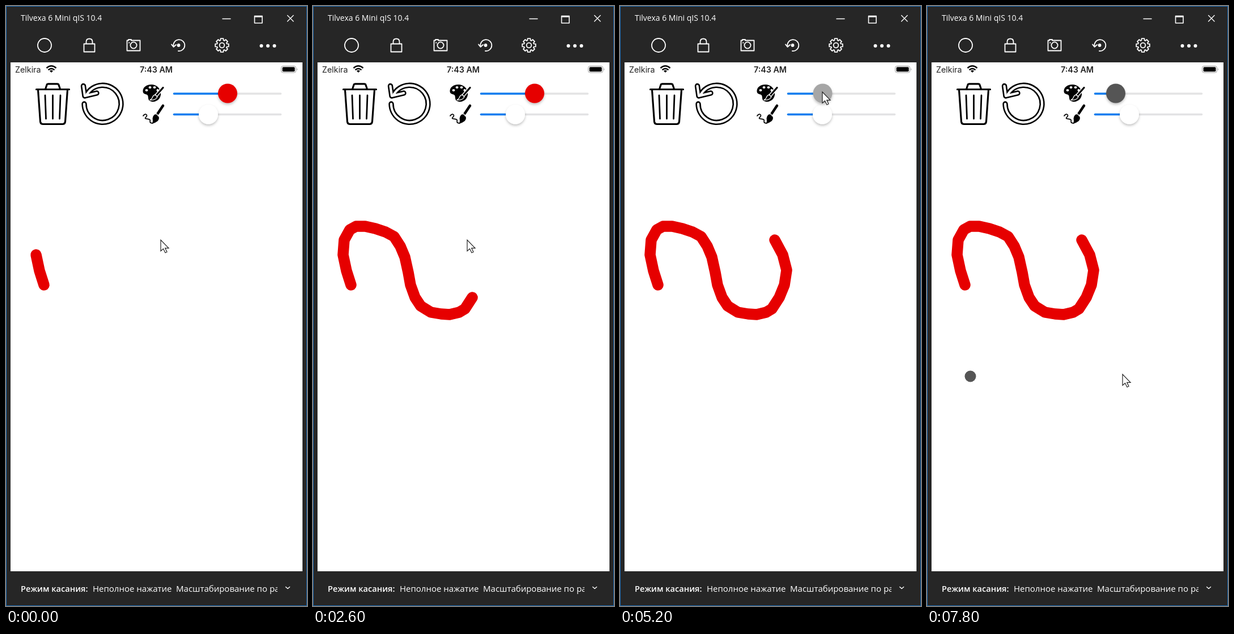
Recreate the animation shown at these times as an HTML page. Size 531 by 1054 pixels, loop 8 s.

```html
<!DOCTYPE html>
<html lang="ru">
<head>
<meta charset="utf-8">
<title>Drawing demo</title>
<style>
html, body { margin: 0; width: 100%; height: 100%; overflow: hidden; background: #262626; }
svg { display: block; width: 531px; height: 1054px; }
text { font-family: "Open Sans", "Noto Sans", sans-serif; fill: #fff; }
.status text { font: 14.3px Inter, Roboto, sans-serif; fill: #222; }
.line { fill: none; stroke-linecap: round; stroke-linejoin: round; }
.light { stroke: #fff; stroke-width: 1.8; }
.dark { stroke: #000; stroke-width: 3.2; }
</style>
</head>
<body>
<svg viewBox="0 0 531 1054">
  <defs>
    <filter id="shadow" x="-50%" y="-50%" width="200%" height="200%">
      <feDropShadow dx="0" dy="2.5" stdDeviation="2.2" flood-opacity=".25"/>
    </filter>
    <clipPath id="footerClip"><rect x="296" y="1005" width="183" height="36"/></clipPath>
  </defs>

  <rect x=".5" y=".5" width="530" height="1053" fill="#262626" stroke="#1c6db8"/>
  <rect x="8" y="99" width="515" height="894" fill="#fff"/>

  <!-- window title and toolbar -->
  <text x="26" y="26" font-size="14">Tilvexa 6 Mini qIS 10.4</text>
  <g class="line light">
    <path d="M382 22.5H396M496.500 16.500L507 27M507 16.500L496.500 27" stroke-width="1.4"/>
    <path d="M438.500 17.500H452V30H438.500ZM438.500 19H452" stroke-width="1.6"/>
    <circle cx="68" cy="69" r="12"/>
    <path d="M137.500 66.500H156.500V80.500H137.500ZM141.500 66V63Q141.500 57.500 147 57.500T152.500 63V66"/>
    <path d="M213.500 60.500H216V59H221V60.500H236.500V78.500H213.500Z"/>
    <circle cx="225" cy="69" r="5.600"/>
    <path d="M217 64.500H217.500"/>
    <path d="M295.500 71A10 10 0 1 1 304 79M292 67.500L295.500 72L300 68"/>
    <circle cx="304.500" cy="69" r="2" fill="#fff"/>
    <path id="gear"/>
    <circle cx="381" cy="69" r="4.300"/>
    <path d="M493.500 1020.500L497 1023.500L500.500 1020.500" stroke-width="1.4"/>
  </g>
  <g fill="#fff">
    <circle cx="450.500" cy="70" r="3"/><circle cx="462" cy="70" r="3"/><circle cx="473.500" cy="70" r="3"/>
  </g>

  <!-- phone status bar -->
  <g class="status">
    <text x="16" y="117">Zelkira</text>
    <text x="265" y="117" text-anchor="middle" style="font-weight:600">7:43 AM</text>
    <g class="line" stroke="#000" stroke-width="2.4" style="stroke-linecap:butt">
      <path d="M71.500 109Q80 101.500 88.500 109M74.500 112.300Q80 107.500 85.500 112.300"/>
      <path d="M77 114Q80 111.700 83 114L80 117Z" fill="#000" stroke="none"/>
    </g>
    <rect x="485.500" y="105.500" width="26" height="11.500" rx="3.300" fill="none" stroke="#999"/>
    <rect x="487.500" y="107.300" width="22" height="8" rx="1.800"/>
    <path d="M513.300 109.300Q515.500 111.300 513.300 113.300Z" fill="#999"/>
  </g>

  <!-- trash and undo -->
  <g class="line dark">
    <path d="M53.500 146.500H111.500M69.500 146L72 138.500Q72.500 136.800 74.500 136.800H90.500Q92.500 136.800 93 138.500L95.500 146"/>
    <path d="M56.500 147L60.500 203Q61 207.500 65.500 207.500H99.500Q104 207.500 104.500 203L108.500 147"/>
    <path d="M69 157L70.500 198M82.500 157V198M96 157L94.500 198" stroke-width="2.8"/>
  </g>
  <g class="line">
    <path id="undo" d="M138 172A32.500 32.500 0 1 0 143 154.500M136.500 140.500L139 158L160 153" stroke="#000" stroke-width="9.400"/>
    <use href="#undo" id="undoCore"/>
    <path d="M138 172A32.500 32.500 0 1 0 143 154.500M136.500 140.500L139 158L160 153" stroke="#fff" stroke-width="4.200"/>
  </g>

  <!-- palette and brush -->
  <path d="M258 138C248 137 241 143 241.500 150C242 156 248 154 250 157C252 161 249 166 257 168C266 169.500 274 162 273 153C272 144 266 139 258 138Z"/>
  <g fill="#fff">
    <ellipse cx="248" cy="148" rx="2.500" ry="2"/><ellipse cx="254" cy="143" rx="2.500" ry="2"/>
    <ellipse cx="262" cy="143" rx="2.500" ry="2"/><ellipse cx="267.500" cy="148" rx="2" ry="2.300"/>
  </g>
  <g class="line">
    <path d="M277 143.500L266 156" stroke="#fff" stroke-width="6"/>
    <path d="M277 143.500L266 156" stroke="#000" stroke-width="3.200"/>
    <path d="M263 156L267 159.500Q264 166 254 165Q258 163 258.500 160Q260 156.500 263 156Z" fill="#000" stroke="#fff" stroke-width="1.300"/>
    <path d="M242 193C246 187 251 192 247 195C242 200 252 197 254 200C255 203 252 205 258 206" stroke="#000" stroke-width="1.700"/>
    <path d="M277 175L267 190" stroke="#000" stroke-width="4.500"/>
    <path d="M263.500 190L269.500 194.500Q272 203 257 207Q260 203 258.500 198Q259 192 263.500 190Z" fill="#000"/>
    <path d="M264 188.500L271 193.500" stroke="#fff" stroke-width="1.300"/>
  </g>

  <!-- sliders -->
  <g class="line" stroke-width="3.600">
    <path d="M296.500 154H484.500M296.500 190.500H484.500" stroke="#e3e3e4"/>
    <path id="filled" stroke="#0a7cf0"/>
    <path d="M296.500 190.500H357" stroke="#0a7cf0"/>
  </g>
  <circle cx="357" cy="190.500" r="17" fill="#fff" filter="url(#shadow)"/>
  <circle id="thumb" cy="153.500" r="17" filter="url(#shadow)"/>

  <!-- drawing -->
  <polyline id="stroke" class="line" stroke="#e60000" stroke-width="19.500"/>
  <circle id="dot" cx="76.500" cy="650.500" r="10" fill="#555"/>

  <path id="cursor" d="M0 0V19.500L4.500 15.500L8 22.500L11 21L7.700 14.300H14Z" fill="#fff" stroke="#222" stroke-width="1.200"/>

  <!-- footer -->
  <text x="26" y="1029" font-size="14.6" font-weight="600">Режим касания:</text>
  <text x="153" y="1029" font-size="15">Неполное нажатие</text>
  <text x="300" y="1029" font-size="15" clip-path="url(#footerClip)">Масштабирование по размеру</text>
</svg>
<script>
const STEP = 200, STEPS = 40;
const el = id => document.getElementById(id);

const points = [
  [67, 490], [59, 465], [53, 437], [55, 411], [65, 393], [76, 387], [92, 387],
  [110, 391], [128, 397], [143, 405], [154, 422], [162, 441], [168, 468],
  [172, 490], [180, 512], [190, 527], [208, 538], [226, 541], [241, 542],
  [258, 538], [268, 532], [281, 512], [290, 490], [294, 464], [287, 437], [273, 411]
];
// Tables: [step, values...], linear in between
const drawn = [[0, 2], [6, 11], [10, 14], [12, 20], [16, 23], [18, 25]];
const knob = [[22, 391], [26, 357.5], [30, 333]];
const pointer = [
  [0, 273, 411], [1, 272, 411], [18, 272, 411], [21, 383, 174], [22, 391, 153],
  [26, 357, 151], [30, 332, 153], [31, 332, 153], [34, 76, 650], [35, 200, 674], [36, 345, 647]
];
const palette = ['#000', '#555', '#a6a6a6', '#fff', '#808080', '#e60000'];

function sample(table, step) {
  const i = table.findIndex(row => row[0] > step);
  if (i < 0) return table[table.length - 1].slice(1);
  if (i === 0) return table[0].slice(1);
  const a = table[i - 1], b = table[i], k = (step - a[0]) / (b[0] - a[0]);
  return a.slice(1).map((v, j) => v + (b[j + 1] - v) * k);
}

function gearPath() {
  const corners = [];
  for (let i = 0; i < 8; i++) {
    for (const [turn, r] of [[-.3, 9], [-.2, 12], [.2, 12], [.3, 9]]) {
      const a = i * Math.PI / 4 + turn;
      corners.push((381 + r * Math.cos(a)).toFixed(1) + ' ' + (69 + r * Math.sin(a)).toFixed(1));
    }
  }
  return 'M' + corners.join('L') + 'Z';
}

function render(step) {
  const count = Math.round(sample(drawn, step)[0]) + 1;
  el('stroke').setAttribute('points', points.slice(0, count).join(' '));

  const [x] = sample(knob, step);
  el('thumb').setAttribute('cx', x);
  el('thumb').setAttribute('fill', palette[Math.floor((x - 312) / 15.6)]);
  el('filled').setAttribute('d', `M296.5 154H${x}`);

  el('cursor').setAttribute('transform', `translate(${sample(pointer, step).map(Math.round)})`);
  el('dot').setAttribute('visibility', step >= 38 ? 'visible' : 'hidden');
}

el('gear').setAttribute('d', gearPath());
el('undoCore').remove();

const start = performance.now();
function tick() {
  render(Math.floor((performance.now() - start) / STEP) % STEPS);
  requestAnimationFrame(tick);
}
tick();
</script>
</body>
</html>
```
